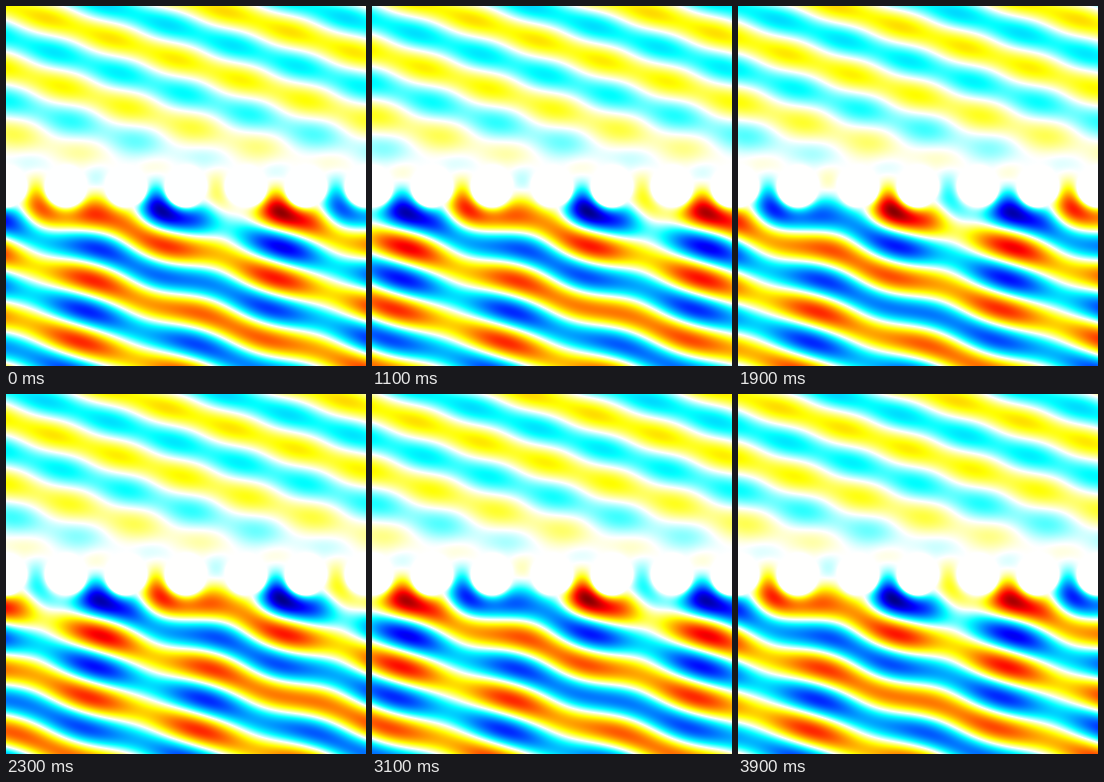
Write a matplotlib script that moves like this. It is 360 by 360 pixels and loops after 4 s.

```python
"""Plane wave scattered by an endless row of sound-soft spheres, seen in a slice."""
from math import factorial

import numpy as np
import matplotlib.pyplot as plt
from matplotlib.animation import FuncAnimation
from matplotlib.colors import LinearSegmentedColormap
from numpy.polynomial.legendre import Legendre, leggauss

SIZE = 360
CELL = 60                  # pixels between sphere centres
FRAMES = 40
K = 2 * np.pi              # wavelength equals the spacing
SIN = 0.3
ALPHA, BETA = K * SIN, K * np.sqrt(1 - SIN**2)
RADIUS = 0.35
ORDER = 7
REACH = 40                 # neighbours summed on each side


def hankel(x):
    """Spherical Hankel functions of the first kind, orders 0 to ORDER."""
    h = [np.exp(1j * x) / (1j * x)]
    h.append(h[0] * (1 / x - 1j))
    for n in range(1, ORDER):
        h.append((2 * n + 1) / x * h[n] - h[n - 1])
    return h


def multipoles(x, y, z):
    """Outgoing waves of one sphere that are even in z, one per row."""
    r = np.maximum(np.sqrt(x**2 + y**2 + z**2), RADIUS)
    cos = z / r
    rho = np.hypot(x, y)
    turn = (x + 1j * y) / np.maximum(rho, 1e-9)
    sin = np.sqrt(1 - cos**2)
    rows = []
    for n, (h, edge) in enumerate(zip(hankel(K * r), hankel(K * RADIUS))):
        for m in range(n % 2, n + 1, 2):
            scale = np.sqrt(factorial(n - m) / factorial(n + m))
            wave = h / edge * scale * sin**m * Legendre.basis(n).deriv(m)(cos)
            spin = turn**m
            rows.append(wave * spin)
            if m:
                rows.append(wave * spin.conj())
    return np.array(rows)


def row_waves(x, y, z):
    """Multipoles summed over the row, with a soft cut-off at its ends."""
    total = 0
    for j in range(-REACH, REACH + 1):
        s = np.clip((abs(j) / REACH - 0.3) / 0.7, 0, 1)
        weight = np.cos(np.pi / 2 * s)**2 * np.exp(1j * ALPHA * j)
        total = total + weight * multipoles(x - j, y, z)
    return total


def incident(x, y):
    return np.exp(1j * (ALPHA * x + BETA * y))


def solve():
    """Strengths that make the total field vanish on the spheres."""
    nodes, weights = leggauss(20)
    cos, phi = np.meshgrid(nodes[10:], np.arange(28) * 2 * np.pi / 28)
    w = np.sqrt(np.broadcast_to(weights[10:], cos.shape)).ravel()
    cos, phi = cos.ravel(), phi.ravel()
    sin = np.sqrt(1 - cos**2)
    x, y, z = RADIUS * sin * np.cos(phi), RADIUS * sin * np.sin(phi), RADIUS * cos
    matrix = row_waves(x, y, z).T * w[:, None]
    return np.linalg.lstsq(matrix, -incident(x, y) * w, rcond=None)[0]


def slice_field():
    """Complex field on the stage, built from one cell."""
    xs = (np.arange(CELL) + 0.5) / CELL - 0.5
    ys = (SIZE / 2 - np.arange(SIZE) - 0.5) / CELL
    x, y = np.meshgrid(xs, ys)
    flat_x, flat_y = x.ravel(), y.ravel()
    waves = row_waves(flat_x, flat_y, np.zeros_like(flat_x))
    cell = (incident(flat_x, flat_y) + solve() @ waves).reshape(x.shape)
    cell[np.hypot(x, y) <= RADIUS] = 0
    wide = np.hstack([cell * np.exp(1j * ALPHA * j) for j in range(-3, 4)])
    return wide[:, CELL // 2:CELL // 2 + SIZE]


cmap = LinearSegmentedColormap.from_list("wave", [
    (0, (0, 0, 0.5)), (0.125, (0, 0, 1)), (0.375, (0, 1, 1)), (0.5, (1, 1, 1)),
    (0.625, (1, 1, 0)), (0.875, (1, 0, 0)), (1, (0.5, 0, 0))], N=1024)

field = slice_field()
peak = np.abs(field).max()

fig = plt.figure(figsize=(3.6, 3.6), dpi=100)
ax = fig.add_axes([0, 0, 1, 1])
ax.axis("off")
image = ax.imshow(field.real, cmap=cmap, vmin=-peak, vmax=peak,
                  interpolation="nearest", aspect="auto")


def draw(i):
    image.set_data((field * np.exp(-2j * np.pi * i / FRAMES)).real)
    return [image]


anim = FuncAnimation(fig, draw, frames=FRAMES, interval=100, repeat=True, repeat_delay=0)
plt.show()
```
